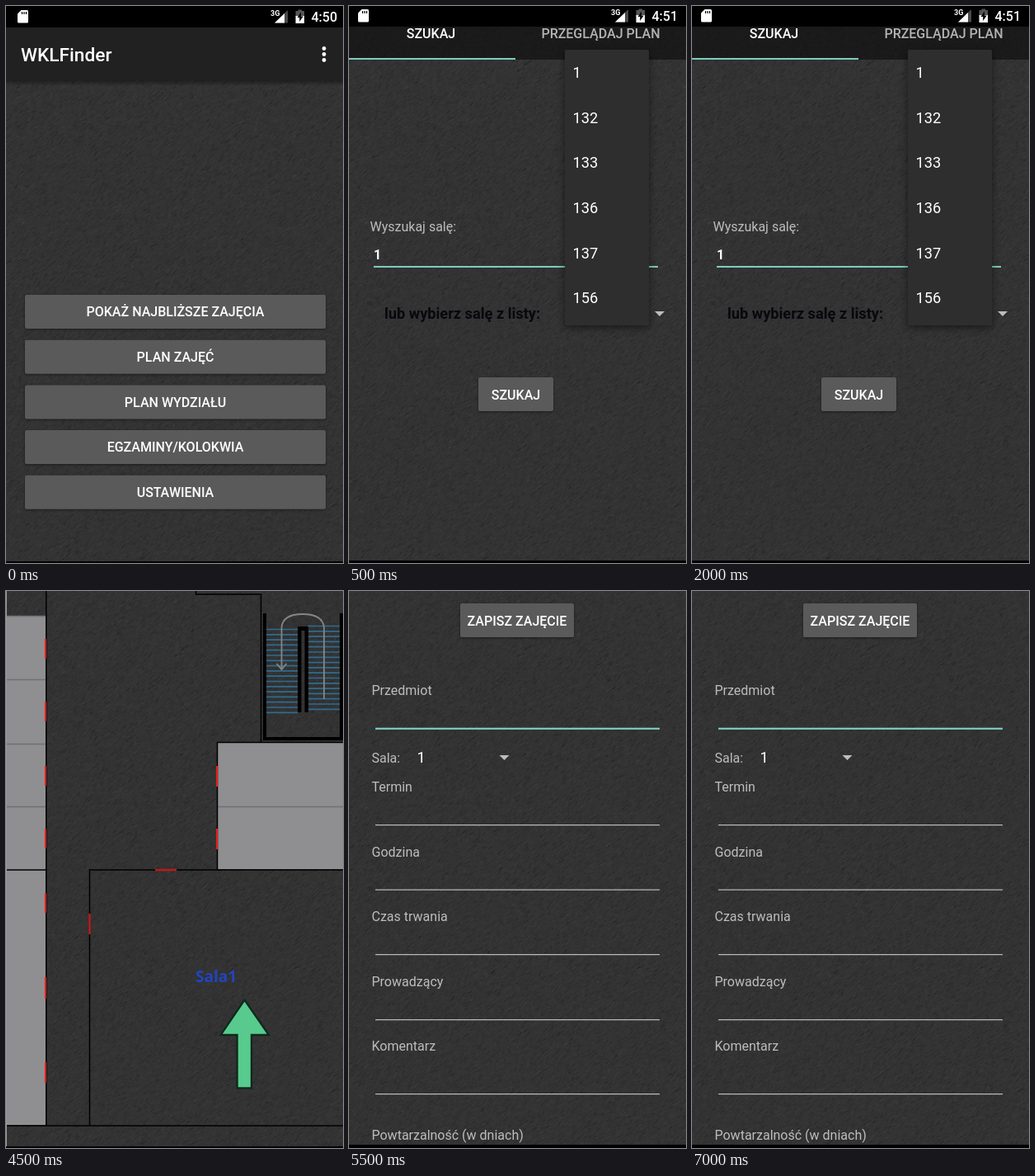
An HTML page with a canvas that plays this animation: 409 by 675 pixels, repeating every 8000 ms.

```html
<!DOCTYPE html>
<html lang="pl">
<head>
<meta charset="utf-8">
<title>Plan zajęć</title>
<style>
html, body { margin: 0; width: 100%; height: 100%; overflow: hidden; background: #000; }
canvas, svg { position: absolute; left: 0; top: 0; width: 409px; height: 675px; }
text { font: 400 16px Roboto, sans-serif; fill: #bdbdbd; white-space: pre; }
.btn { fill: #5a5a5b; filter: drop-shadow(0 1.5px 1.5px rgba(0, 0, 0, .45)); }
.cap { font-weight: 500; fill: #fff; text-anchor: middle; }
.dim { fill: #b4b4b4; }
.clock { font-weight: 500; fill: #fff; }
.title { font-size: 22.7px; font-weight: 500; fill: #fff; }
.item { font-size: 18.2px; fill: #fff; }
.net { font-size: 9px; font-weight: 700; fill: #fff; }
.typed { font-weight: 700; fill: #fff; }
.hint { font-size: 18.2px; font-weight: 700; fill: #08080e; }
.room { font: 700 19px "Open Sans", sans-serif; fill: #2244c0; }
.teal { fill: #80cbc0; }
.popup { fill: #2e2e2e; filter: drop-shadow(0 3px 5px rgba(0, 0, 0, .5)); }
.wall, .red, .grid, .steps, .route { fill: none; }
.wall { stroke: #000; stroke-width: 1.5; }
.well { stroke-width: 4; }
.red { stroke: #ee1c1c; stroke-width: 2; }
.door { stroke: #bc1a1a; stroke-width: 2.5; }
.grid { stroke: #707072; stroke-width: 1.5; }
.steps { stroke: #2f6b90; stroke-width: 1.7; }
.route { stroke: #858587; stroke-width: 1.8; }
.scene { visibility: hidden; animation: 8s step-end infinite; }
#menu { animation-name: menu; }
#search { animation-name: search; }
#map { animation-name: map; }
#form { animation-name: form; }
@keyframes menu { 0% { visibility: visible } 6.25%, 100% { visibility: hidden } }
@keyframes search { 0% { visibility: hidden } 6.25% { visibility: visible } 37.5%, 100% { visibility: hidden } }
@keyframes map { 0% { visibility: hidden } 37.5% { visibility: visible } 68.75%, 100% { visibility: hidden } }
@keyframes form { 0% { visibility: hidden } 68.75%, 100% { visibility: visible } }
</style>
</head>
<body>
<canvas id="cloth" width="409" height="675"></canvas>
<svg viewBox="0 0 409 675">
  <defs>
    <linearGradient id="shade" x2="0" y2="1">
      <stop stop-opacity=".4"/><stop offset="1" stop-opacity="0"/>
    </linearGradient>
    <rect id="wide" class="btn" x="23" width="365" height="41" rx="2"/>
    <path id="caret" d="M0 0h12l-6 6z" fill="#bdbdbd"/>
    <rect id="field" x="32" width="345" height="1.2" fill="#bdbdbd"/>
    <g id="icons">
      <path d="M18.5 5H25.5Q27 5 27 6.5V19Q27 20.5 25.5 20.5H15.5Q14 20.5 14 19V9.5Z" fill="#fff"/>
      <path d="M19.5 7v3M22 7v3M24.5 7v3" stroke="#000" stroke-width="1.2"/>
      <text class="net" x="321" y="12">3G</text>
      <path d="M342 5V20.5H326Z" fill="#4a4a4a"/>
      <path d="M338 9V20.5H326Z" fill="#fff"/>
      <path d="M354.5 4.5h4.500v1.500h3v6.500h-10.500v-6.500h3z" fill="#555"/>
      <path d="M351.5 12h10.500v9h-10.500z" fill="#fff"/>
      <path d="M358 7.5l-4.500 6.500h2.700v5l4.500-6.500h-2.700z" fill="#000"/>
    </g>
  </defs>

  <g id="menu" class="scene">
    <rect y="90" width="409" height="7" fill="url(#shade)"/>
    <rect width="409" height="26"/>
    <rect y="26" width="409" height="64" fill="#212121"/>
    <use href="#icons"/>
    <text class="clock" x="370.5" y="19">4:50</text>
    <text class="title" x="18" y="67">WKLFinder</text>
    <g fill="#fff">
      <circle cx="386" cy="51.5" r="2.4"/><circle cx="386" cy="58.5" r="2.4"/><circle cx="386" cy="65.5" r="2.4"/>
    </g>
    <use href="#wide" y="350"/><text class="cap" x="205.5" y="376">POKAŻ NAJBLIŻSZE ZAJĘCIA</text>
    <use href="#wide" y="404.7"/><text class="cap" x="205.5" y="431">PLAN ZAJĘĆ</text>
    <use href="#wide" y="459.4"/><text class="cap" x="205.5" y="486">PLAN WYDZIAŁU</text>
    <use href="#wide" y="514"/><text class="cap" x="205.5" y="540">EGZAMINY/KOLOKWIA</text>
    <use href="#wide" y="568.7"/><text class="cap" x="205.5" y="595">USTAWIENIA</text>
    <rect y="673" width="409" height="2"/>
  </g>

  <g id="search" class="scene">
    <rect y="25" width="409" height="40" fill="#0c0c0c" fill-opacity=".62"/>
    <rect width="409" height="25"/>
    <use href="#icons" x="-3" y="-1"/>
    <text class="clock" x="367.5" y="18">4:51</text>
    <text class="cap" x="99.5" y="39">SZUKAJ</text>
    <text class="cap dim" x="305.5" y="39">PRZEGLĄDAJ PLAN</text>
    <rect class="teal" y="63" width="202" height="2"/>
    <text x="25.5" y="273">Wyszukaj salę:</text>
    <text class="typed" x="30" y="307">1</text>
    <rect class="teal" x="30" y="315" width="345" height="2"/>
    <text class="hint" x="43" y="379">lub wybierz salę z listy:</text>
    <use href="#caret" x="371" y="370"/>
    <rect class="btn" x="157" y="450" width="91" height="41" rx="2"/>
    <text class="cap" x="202.5" y="477">SZUKAJ</text>
    <rect class="popup" x="262" y="53" width="102" height="334" rx="1.5"/>
    <text class="item" x="271.5" y="87">1</text>
    <text class="item" x="271.5" y="142">132</text>
    <text class="item" x="271.5" y="196">133</text>
    <text class="item" x="271.5" y="251">136</text>
    <text class="item" x="271.5" y="306">137</text>
    <text class="item" x="271.5" y="360">156</text>
    <rect y="672" width="409" height="3"/>
  </g>

  <g id="map" class="scene">
    <path d="M1 30.5H48V647H1zM257 184H409V337H257z" fill="#8f8f91"/>
    <path class="grid" d="M1 30.5H48M1 107.5H48M1 185.5H48M1 261.5H48M257 261.5H409"/>
    <path class="wall" d="M48.8 0V648M0 338H48.8M230.5 0V4H309.5V183.5M409 183.5H256.5V338M409 338H101.5V648M0 648H409"/>
    <path class="red" d="M48 58v24m0 52v24m0 54v24m0 52v24m0 54v24m0 78v26m0 77v25M256 212v25m0 51v25"/>
    <path class="red door" d="M181 338h26M101.5 391v25"/>
    <path class="steps" id="steps"/>
    <path class="wall well" d="M314 27V179H407V27"/>
    <path d="M354 147V43H367V147H362.5V48H358.5V147z"/>
    <path class="route" d="M386 131V44Q384 28 360 28T334.5 44V94M328.5 88L334.5 95L340.5 88"/>
    <text class="room" x="230" y="474">Sala1</text>
    <path d="M289.5 495.5L319 538H298V602.5H280.5V538H260.5z" fill="#58ca8e" stroke="#10281d" stroke-width="2.4"/>
    <rect width="1" height="673" fill="#9a9a9a"/>
    <rect y="673" width="409" height="2"/>
  </g>

  <g id="form" class="scene">
    <rect class="btn" x="135" y="15" width="138" height="41" rx="2"/>
    <text class="cap" x="204" y="42">ZAPISZ ZAJĘCIE</text>
    <text x="27.5" y="126">Przedmiot</text>
    <rect class="teal" x="32" y="165.7" width="345" height="2.2"/>
    <text x="27.5" y="208">Sala:</text>
    <text class="item" x="82.5" y="208">1</text>
    <use href="#caret" x="182.5" y="199"/>
    <text x="27.5" y="243">Termin</text><use href="#field" y="283"/>
    <text x="27.5" y="322">Godzina</text><use href="#field" y="361.5"/>
    <text x="27.5" y="400">Czas trwania</text><use href="#field" y="440"/>
    <text x="27.5" y="479">Prowadzący</text><use href="#field" y="519"/>
    <text x="27.5" y="557">Komentarz</text><use href="#field" y="609"/>
    <text x="27.5" y="665">Powtarzalność (w dniach)</text>
    <rect y="671" width="409" height="4"/>
  </g>
</svg>
<script>
// Woven backdrop: seeded short diagonal threads
const ctx = document.getElementById('cloth').getContext('2d');
let seed = 7;
const rnd = () => (seed = seed * 16807 % 2147483647) / 2147483647;
ctx.fillStyle = '#333';
ctx.fillRect(0, 0, 409, 675);
for (let i = 0; i < 50000; i++) {
  const x = rnd() * 419 - 10, y = rnd() * 685, len = 1.5 + rnd() * 3;
  ctx.strokeStyle = i % 2 ? 'rgba(0,0,0,.1)' : 'rgba(255,255,255,.025)';
  ctx.beginPath();
  ctx.moveTo(x, y);
  ctx.lineTo(x + len, y - len * .75);
  ctx.stroke();
}

// Two flights of stairs
let d = '';
for (let i = 0; i < 17; i++) d += `M316 ${46.5 + i * 6.3}H354M366 ${42.5 + i * 6.3}H405`;
document.getElementById('steps').setAttribute('d', d);
</script>
</body>
</html>
```
